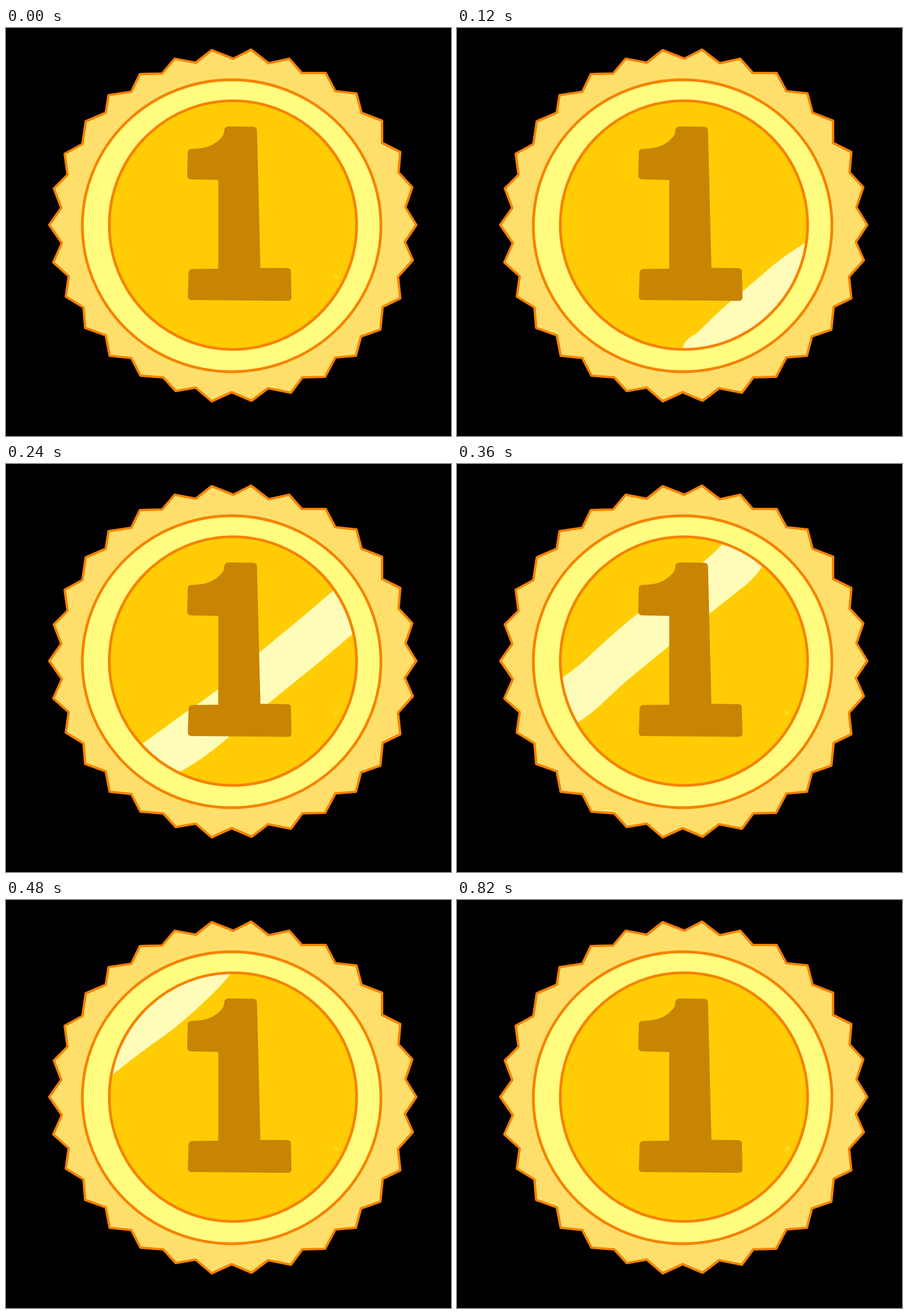
An HTML page for the animation above (960 ms loop, 781 by 717 pixels).

```html
<!DOCTYPE html>
<html lang="en">
<head>
<meta charset="utf-8">
<title>Gold medal</title>
<style>
  html, body { margin: 0; width: 100%; height: 100%; overflow: hidden; background: #000; }
  svg { display: block; width: 100%; height: 100%; }
  .line { stroke: #f78200; stroke-width: 4.8; stroke-linejoin: round; }
</style>
</head>
<body>
<svg viewBox="0 0 781 717">
  <defs>
    <clipPath id="face"><ellipse cx="398.3" cy="346.3" rx="217" ry="218.5"/></clipPath>
  </defs>
  <polygon class="line" fill="#ffdf6b" style="stroke-width:4.2" points="
    361,39 399,54 430,38 461,62 497,54 519,79 561,79 578,111 615,115 624,149
    660,163 660,202 692,218 689,254 713,280 701,315 720,346 700,376 714,408 688,437
    692,475 661,490 657,530 623,542 614,576 578,579 560,613 520,614 500,641 460,633
    431,655 396,640 361,656 333,632 298,638 276,614 236,611 220,580 182,576 175,540
    139,527 136,491 105,472 110,436 83,412 98,378 76,346 97,316 84,282 108,258
    103,221 134,204 140,164 175,149 180,118 220,112 235,81 274,80 296,54 333,61"/>
  <ellipse class="line" fill="#fffc80" cx="396" cy="347.5" rx="262" ry="256.5"/>
  <g clip-path="url(#face)">
    <rect x="170" y="120" width="460" height="460" fill="#ffcc05"/>
    <circle cx="579.5" cy="437" r="4" fill="#ffd824"/>
    <path id="shine" fill="#fffcb9"/>
  </g>
  <ellipse class="line" fill="none" cx="398.3" cy="346.3" rx="217" ry="218.5"/>
  <path fill="#c88403" d="M390 173L434 173.5Q440 174 440.500 180L446.500 421.500L494 422Q500 422.500 500 428L501 473Q501 479 495 479.500
    L325 478Q319 477.500 319 472L320.500 430Q321 424 327 423.500L372.500 423V267L324 266Q318 265 318 259L319 218
    Q319.500 213 325 212.500C348 212 366 208 380 190Q383 186 383 180Q384 173.500 390 173Z"/>
</svg>
<script>
  const LOOP = 960, STEP = 120;
  const shine = document.getElementById("shine");

  // The glint crosses the face in held poses, from lower right to upper left.
  const poses = [
    "",
    "M625 370L611 378Q580 396 556 416L500 464Q475 484 455 503Q432 526 420 537Q404 545 400 553L394 566V590H640Z",
    "M590 209L575 222L520 269L445 331L372 396Q350 413 320 433L240 491L222 504L285 553L305 541Q345 520 393 478L460 421L550 348L608 299L625 285Z",
    "M480 128L466 141Q445 162 430 174L318 262Q275 297 240 330Q215 355 184 376L165 390L190 470L212 454Q235 440 260 416Q285 392 300 379L372 320L442 264L495 222Q521 203 535 181L548 163Z",
    "M400 120L394 130Q377 152 350 177Q328 198 310 213Q285 234 260 251Q225 276 187 307L165 325V110Z"
  ];

  function draw(now) {
    const step = Math.floor((now % LOOP) / STEP);
    shine.setAttribute("d", poses[step] || "");
  }

  const start = performance.now();
  function tick() {
    draw(performance.now() - start);
    requestAnimationFrame(tick);
  }
  tick();
</script>
</body>
</html>
```
